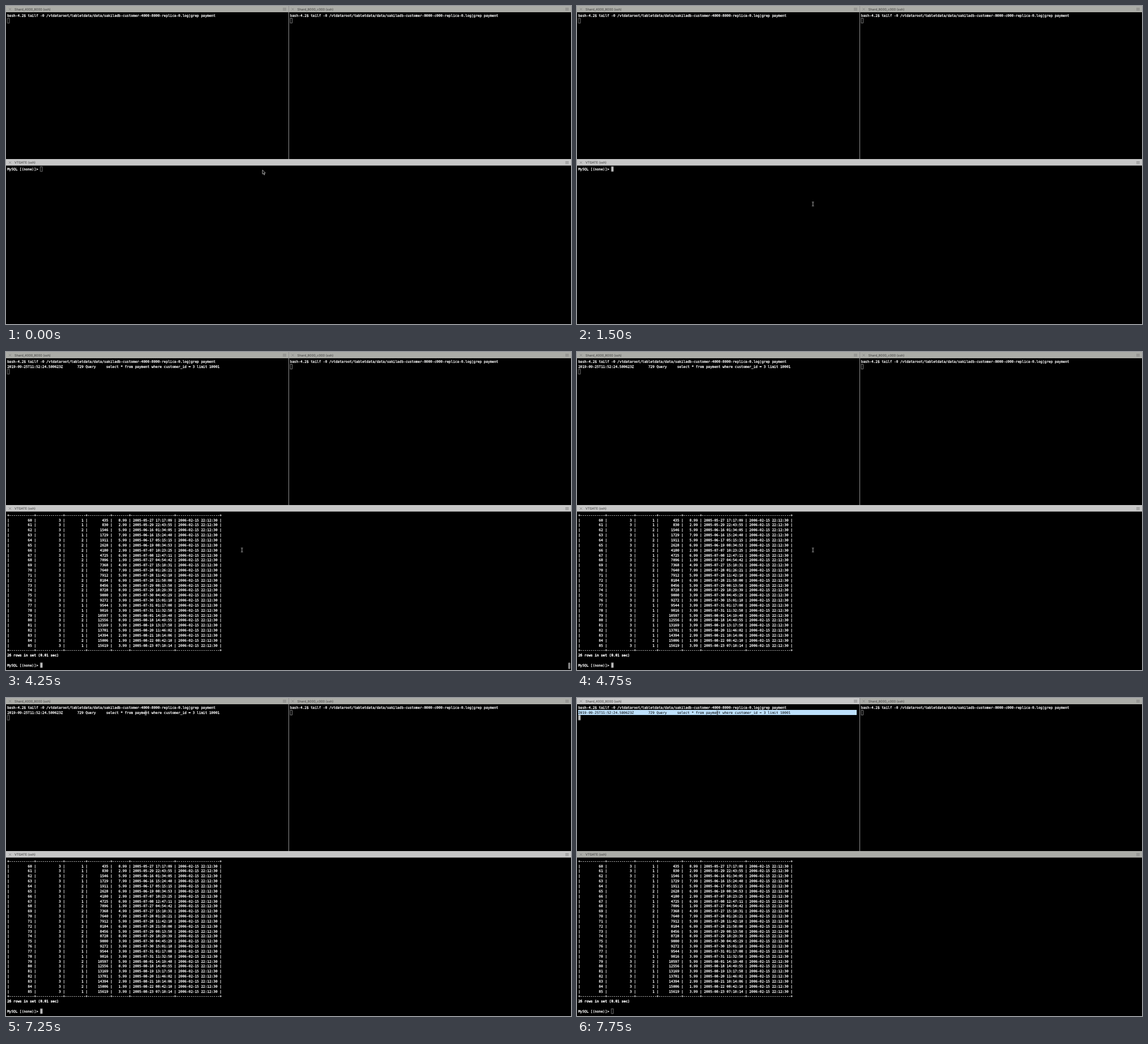
Write an HTML page that moves like this. It is 998x561 px and loops after 8 s.

```html
<!DOCTYPE html>
<html lang="en">
<head>
<meta charset="utf-8">
<title>Sharded query log</title>
<style>
html, body { margin: 0; width: 100%; height: 100%; overflow: hidden; background: #000; }
svg { display: block; width: 100%; height: 100%; }
text { white-space: pre; text-rendering: geometricPrecision; }
.mono { font: 6.06px "DejaVu Sans Mono", monospace; fill: #fff; stroke: #fff; stroke-width: .26px; }
.strong { stroke-width: .42px; }
.title { font: 5.7px Inter, sans-serif; fill: #3d3d3d; }
.bar { fill: #abaca7; }
.icon { fill: none; stroke: #777; stroke-width: .7; }
.caret { fill: #000; stroke: #a8a8a8; stroke-width: .7; }
.ibeam { fill: none; stroke: #d0d0d0; stroke-width: .9; }

/* every change is a hard cut on a quarter-second grid */
.anim { animation: 8s step-end infinite; }
#gateBar { animation-name: gateBar; }
#leftBar { animation-name: leftBar; }
#gateCaret { animation-name: gateMove, gateFill; }
#leftCaret { animation-name: leftMove, leftFill; }
#arrow { animation-name: arrow, early; }
#beam { animation-name: beam, late; }
#query { animation-name: query; }
#prompt { animation-name: before; }
#table { animation-name: after; }
#thumb { animation-name: thumb; }
#mark { animation-name: mark; }
#log { animation-name: after, logInk; }

@keyframes gateBar { 0% { fill: #c7c7c7 } 93.75%, 100% { fill: #abaca7 } }
@keyframes leftBar { 0% { fill: #abaca7 } 93.75%, 100% { fill: #c7c7c7 } }
@keyframes gateMove {
  0% { transform: translate(60.7px, 283.4px) }
  31.25% { transform: translate(213.8px, 283.4px) }
  53.125%, 100% { transform: translate(60.7px, 548.3px) }
}
@keyframes gateFill { 0% { fill: #000 } 12.5% { fill: #c4c4c4 } 93.75%, 100% { fill: #000 } }
@keyframes leftMove {
  0% { transform: translate(2.5px, 21.7px) }
  53.125%, 100% { transform: translate(2.5px, 30.5px) }
}
@keyframes leftFill { 0% { fill: #000 } 93.75%, 100% { fill: #c4c4c4 } }
@keyframes arrow {
  0% { transform: translate(453px, 289.2px) }
  3.125% { transform: translate(459px, 292.7px) }
  6.25% { transform: translate(440px, 361.7px) }
  9.375%, 100% { transform: translate(417px, 348.7px) }
}
@keyframes beam {
  0% { transform: translate(416.7px, 349.3px) }
  75% { transform: translate(415.5px, 234.5px) }
  81.25% { transform: translate(313px, 119.5px) }
  84.375% { transform: translate(276px, 49.5px) }
  87.5% { transform: translate(256.5px, 27.5px) }
  90.625% { transform: translate(246.7px, 26.5px) }
  93.75% { transform: translate(248px, 26.5px); stroke: #d0d0d0 }
  96.875%, 100% { transform: translate(248px, 26.5px); stroke: #333 }
}
@keyframes early { 0% { opacity: 1 } 12.5%, 100% { opacity: 0 } }
@keyframes late { 0% { opacity: 0 } 12.5%, 100% { opacity: 1 } }
@keyframes query { 0% { opacity: 0 } 31.25% { opacity: 1 } 53.125%, 100% { opacity: 0 } }
@keyframes before { 0% { opacity: 1 } 53.125%, 100% { opacity: 0 } }
@keyframes after { 0% { opacity: 0 } 53.125%, 100% { opacity: 1 } }
@keyframes thumb { 0% { opacity: 0 } 53.125% { opacity: 1 } 59.375%, 100% { opacity: 0 } }
@keyframes mark { 0% { opacity: 0 } 96.875%, 100% { opacity: 1 } }
@keyframes logInk {
  0% { fill: #fff; stroke: #fff; stroke-width: .26px }
  96.875%, 100% { fill: #000; stroke: #000; stroke-width: .05px }
}
</style>
</head>
<body>
<svg viewBox="0 0 998 561" preserveAspectRatio="none">
  <defs>
    <path id="close" class="icon" d="M-2-2L2 2M-2 2L2-2"/>
    <path id="menu" class="icon" d="M-3-1.8H3M-3 0H3M-3 1.8H3"/>
  </defs>
  <rect width="998" height="561"/>

  <rect id="leftBar" class="bar anim" width="499" height="11"/>
  <rect class="bar" x="500" width="498" height="11"/>
  <rect x="499" width="1" height="270" fill="#929292"/>
  <rect id="gateBar" class="bar anim" y="270" width="998" height="11.5"/>

  <use href="#close" x="7" y="5.6"/>
  <use href="#close" x="506.5" y="5.6"/>
  <use href="#close" x="7" y="276.2"/>
  <use href="#menu" x="492" y="5.6"/>
  <use href="#menu" x="991" y="5.6"/>
  <use href="#menu" x="991" y="276.2"/>
  <text class="title" x="15" y="7.7">Shard_4000_8000 (ssh)</text>
  <text class="title" x="514.5" y="7.7">Shard_8000_c000 (ssh)</text>
  <text class="title" x="15" y="278.3">VTGATE (ssh)</text>

  <rect id="mark" class="anim" x="2" y="21" width="492" height="9" fill="#bde0fb"/>
  <text class="mono" x="2.2" y="19.1">bash-4.2$ tailf -0 /vtdataroot/tabletdata/data/sakiladb-customer-4000-8000-replica-0.log|grep payment</text>
  <text class="mono" x="501.8" y="19.1">bash-4.2$ tailf -0 /vtdataroot/tabletdata/data/sakiladb-customer-8000-c000-replica-0.log|grep payment</text>
  <text id="log" class="mono anim" x="2.2" y="28">2019-09-25T11:52:24.580623Z       729 Query     select * from payment where customer_id = 3 limit 10001</text>

  <text id="prompt" class="mono anim" x="2.2" y="289.8">MySQL [(none)]&gt;</text>
  <text id="query" class="mono anim" x="60.6" y="289.8">SELECT * FROM payment WHERE customer_id=3;</text>
  <g id="table" class="anim"></g>

  <rect id="leftCaret" class="caret anim" width="3.5" height="8.3"/>
  <rect class="caret" x="502.1" y="21.7" width="3.5" height="8.3"/>
  <rect id="gateCaret" class="caret anim" width="3.5" height="8.3"/>
  <rect id="thumb" class="anim" x="993.2" y="547.8" width="3.4" height="11.6" rx="1.7" fill="#8c8c8c"/>

  <path id="arrow" class="anim" d="M0 0V7.3L1.7 5.8L2.9 8.7L4.1 8.2L2.9 5.4H5.2Z" fill="#000" stroke="#e8e8e8" stroke-width=".7"/>
  <path id="beam" class="ibeam anim" d="M-1.6-3.6Q0-3.6 0-2.8V2.8Q0 3.6-1.6 3.6M1.6-3.6Q0-3.6 0-2.8M0 2.8Q0 3.6 1.6 3.6"/>
</svg>
<script>
const FIRST_ID = 60, ROWS = 26, TOP = 289.8, PITCH = 8.84;
const widths = [12, 13, 10, 11, 8, 21, 21];

// rentals come in bursts: row, rental id, time at the turning points
const bursts = [
  [0, 435, "05-27T17:17:09"],
  [1, 830, "05-29T22:43:55"],
  [2, 1546, "06-16T01:34:05"],
  [4, 1911, "06-17T05:15:15"],
  [5, 2628, "06-19T08:34:53"],
  [6, 4180, "07-07T10:23:25"],
  [7, 4725, "07-08T12:47:11"],
  [8, 7096, "07-27T04:54:42"],
  [18, 9816, "07-31T11:32:58"],
  [19, 10597, "08-01T14:19:48"],
  [20, 12556, "08-18T14:49:55"],
  [25, 15619, "08-23T07:10:14"]
].map(([row, rental, time]) => ({ row, rental, time: Date.parse(`2005-${time}Z`) }));

let seed = 7;
function random(n) {
  seed = (seed * 16807) % 2147483647;
  return Math.floor(seed / 2147483647 * n);
}

function formatRow(i) {
  const next = Math.max(1, bursts.findIndex(b => b.row >= i));
  const a = bursts[next - 1], b = bursts[next];
  const part = (i - a.row) / (b.row - a.row);
  const mix = key => Math.round(a[key] + (b[key] - a[key]) * part);
  const time = new Date(mix("time")).toISOString().slice(0, 19).replace("T", " ");
  const staff = 1 + random(2), amount = `${1 + random(8)}.99`;
  const cells = [FIRST_ID + i, 3, staff, mix("rental"), amount, time, "2006-02-15 22:12:30"];
  return "|" + cells.map((c, k) => String(c).padStart(widths[k] - 1) + " |").join("");
}

function addLine(text, row, style) {
  const el = document.createElementNS("http://www.w3.org/2000/svg", "text");
  el.setAttribute("class", style);
  el.setAttribute("x", 2.2);
  el.setAttribute("y", TOP + row * PITCH);
  el.textContent = text;
  document.getElementById("table").append(el);
}

const rule = "+" + widths.map(w => "-".repeat(w) + "+").join("");
const lines = [rule, ...Array.from({ length: ROWS }, (_, i) => formatRow(i)), rule];
lines.forEach((text, row) => addLine(text, row, "mono"));
addLine("26 rows in set (0.01 sec)", lines.length, "mono strong");
addLine("MySQL [(none)]>", lines.length + 2, "mono");
</script>
</body>
</html>
```
